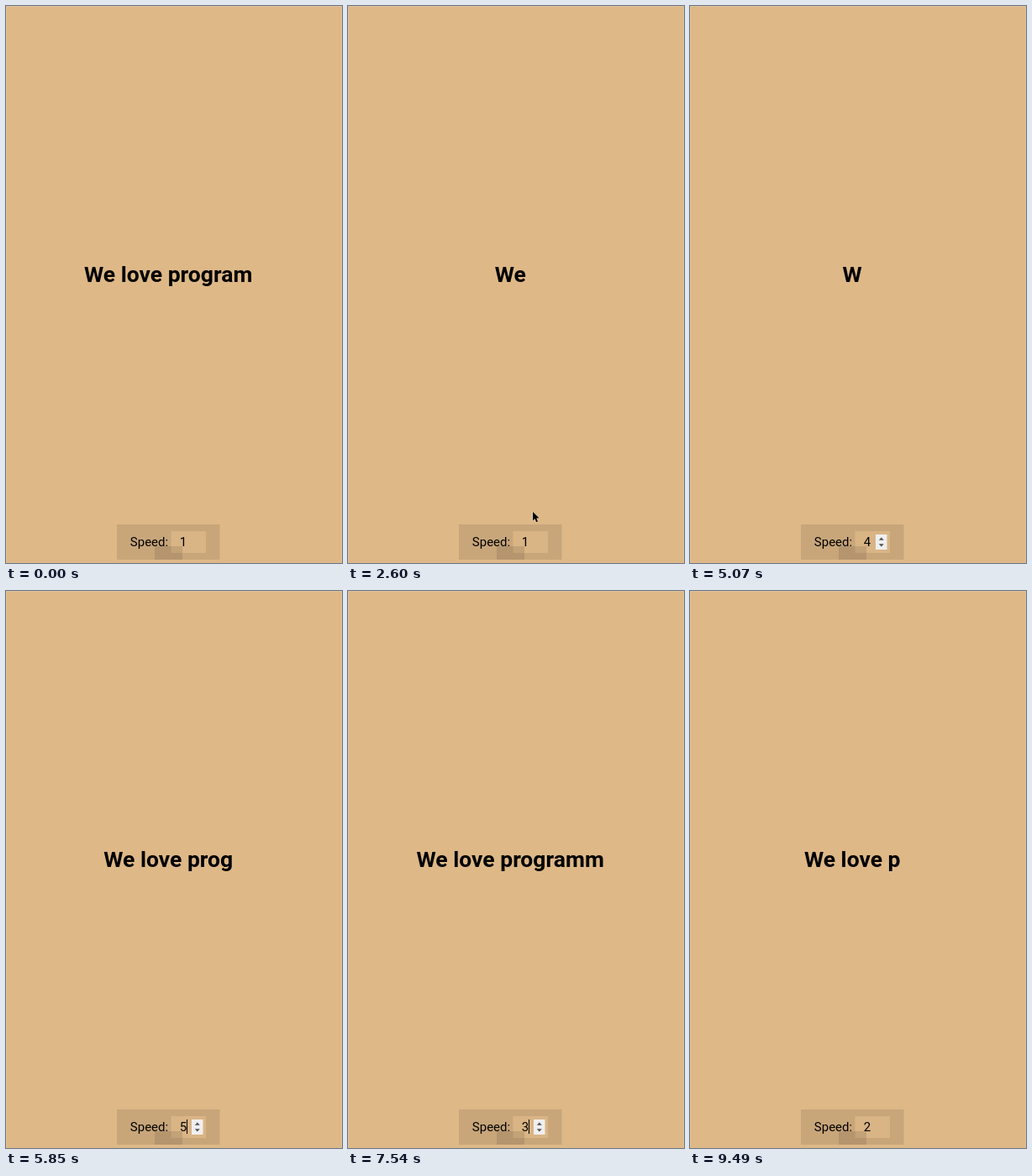
Recreate the animation shown at these times as an HTML page. Size 400 px wide and 664 px high, loop 9.62 s.

```html
<!DOCTYPE html>
<html lang="en">
<head>
<meta charset="utf-8">
<title>Auto text effect</title>
<style>
  html, body { margin: 0; width: 100%; height: 100%; overflow: hidden; background: #deb887; }
  svg { display: block; width: 400px; height: 664px; font-family: Roboto, sans-serif; }
  #heading { font-size: 26.5px; font-weight: 700; text-anchor: middle; }
  .label { font-size: 15px; }
</style>
</head>
<body>
<svg viewBox="0 0 400 664">
  <rect width="400" height="664" fill="#deb887"/>
  <path d="M.5 664V.5H399.5V664" fill="none" stroke="#fff" stroke-opacity=".16"/>
  <text id="heading" x="193.2" y="328.5"></text>

  <rect x="132" y="618" width="122.5" height="42" fill="#c8a67a"/>
  <rect x="196.5" y="626" width="41.5" height="26" fill="#d9b485"/>
  <rect x="177" y="644" width="33" height="16" fill-opacity=".1"/>
  <text class="label" x="147.8" y="643.5">Speed:</text>
  <text class="label" id="speed" x="206.8" y="643.5"></text>
  <rect id="caret" x="215" y="630" width="1" height="17"/>
  <g id="spinner">
    <rect x="221" y="630" width="13.5" height="18" fill="#efefef"/>
    <path d="M224.8 636.8l3-3.4 3 3.4zM224.8 641.2l3 3.4 3-3.4z" fill="#505050"/>
  </g>
  <path id="cursor" d="M0 0V10.5L2.5 8.3 4.2 12.2 6 11.4 4.3 7.6H7.6Z"
        stroke="#f3e6d2" stroke-width=".9" paint-order="stroke"/>
</svg>
<script>
const MESSAGE = 'We love programming!';
const LOOP = 9620, TICK = 130;
const FIRST_LETTERS = 15, FIRST_TIME = -80;

// [time, value of the speed field]
const speeds = [[-1000, 1], [3780, 2], [4110, 3], [4400, 4],
                [5780, 5], [6740, 4], [7190, 3], [7600, 2]];
// [time, x, y] of the pointer tip
const pointer = [[1300, 112, 274], [1430, 142, 527], [2600, 220, 603],
                 [3120, 236, 633], [3380, 229, 633], [4940, 229, 633]];

const $ = id => document.getElementById(id);
const show = (id, on) => $(id).setAttribute('visibility', on ? 'visible' : 'hidden');
const latest = (list, t) => list.filter(([time]) => time <= t).pop();

// Each letter waits 300 ms divided by the speed set when the last one appeared.
function lettersAt(t) {
  let count = FIRST_LETTERS, time = FIRST_TIME;
  while ((time += 300 / latest(speeds, time)[1]) <= t) {
    count = count % MESSAGE.length + 1;
  }
  return count;
}

function pointerAt(t) {
  const next = pointer.findIndex(([time]) => time > t);
  if (next < 1) return null;
  const [t0, x0, y0] = pointer[next - 1], [t1, x1, y1] = pointer[next];
  const k = (t - t0) / (t1 - t0);
  return [x0 + (x1 - x0) * k, y0 + (y1 - y0) * k];
}

function draw(t) {
  $('heading').textContent = MESSAGE.slice(0, lettersAt(t)).trim();

  const [changed, speed] = latest(speeds, t);
  $('speed').textContent = speed;
  show('caret', changed > 0 && (t - changed) % 1000 < 500);
  show('spinner', t >= 3120 && t < 9490);

  const tip = pointerAt(t);
  show('cursor', tip);
  if (tip) $('cursor').setAttribute('transform', `translate(${tip})`);
}

function frame() {
  const t = performance.now() % LOOP;
  draw(Math.floor(t / TICK) * TICK);
  requestAnimationFrame(frame);
}
frame();
</script>
</body>
</html>
```
